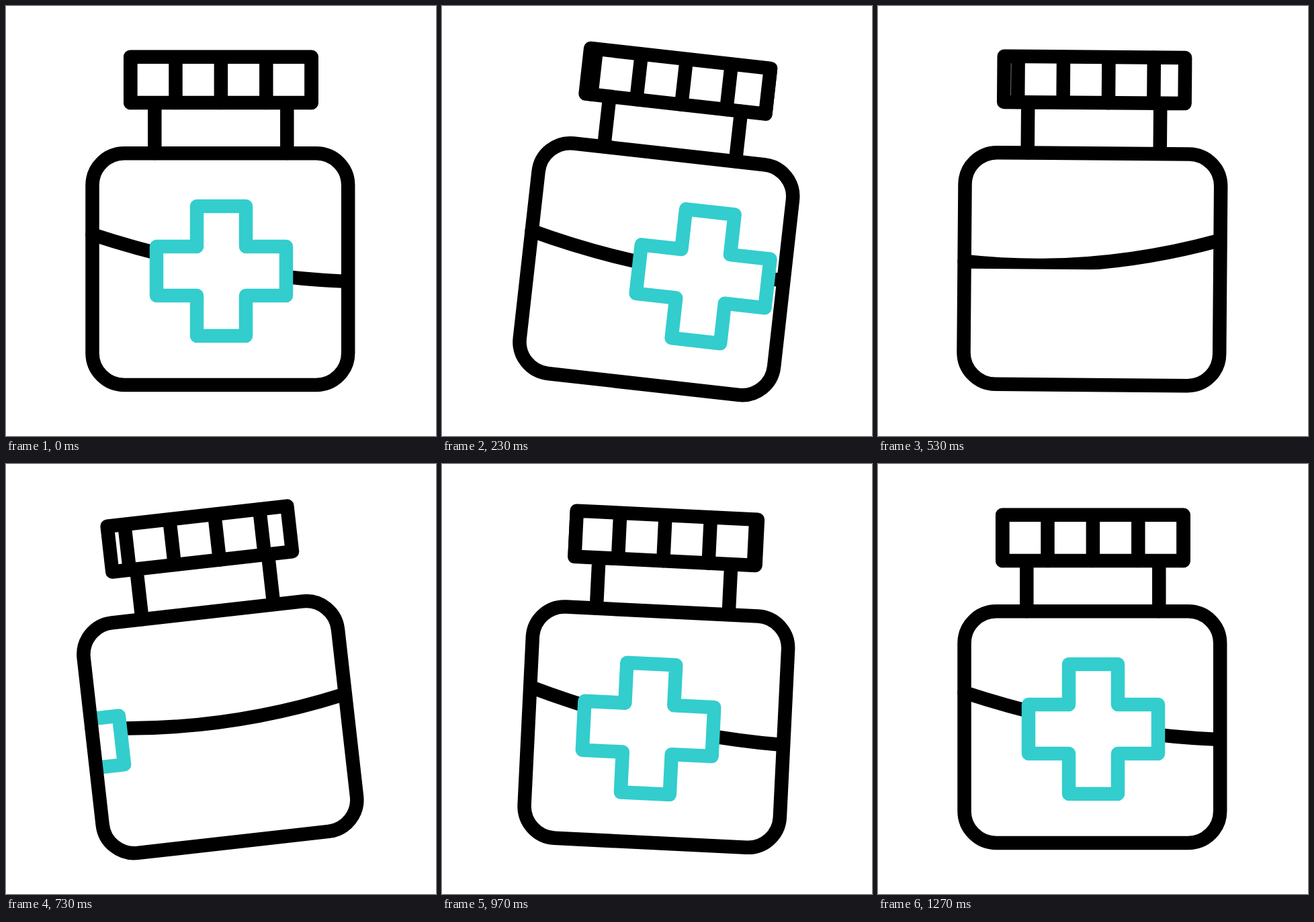
Recreate the animation shown at these times as an HTML page. Size 640 by 640 pixels, loop 1.67 s.

```html
<!DOCTYPE html>
<html lang="en">
<head>
<meta charset="utf-8">
<title>Medicine bottle</title>
<style>
  html, body { margin: 0; width: 100%; height: 100%; overflow: hidden; background: #fff; }
  svg { display: block; width: 100vw; height: 100vh; }
  .ink { fill: none; stroke: #000; stroke-width: 20.5; stroke-linecap: round; stroke-linejoin: round; }
</style>
</head>
<body>
<svg viewBox="0 0 640 640">
  <defs>
    <clipPath id="inBody"><rect x="128.5" y="219.3" width="380.7" height="344.7" rx="47.5"/></clipPath>
    <clipPath id="inCap"><rect x="175" y="65.5" width="290" height="89" rx="10"/></clipPath>
    <clipPath id="inLiquid"><rect id="level" x="100" y="200" width="440" height="220"/></clipPath>
  </defs>
  <g id="bottle">
    <g clip-path="url(#inLiquid)"><path id="wave" class="ink"/></g>
    <g clip-path="url(#inBody)">
      <path id="cross" d="M284 298H357V358H417V431H357V491H284V431H224V358H284Z"
        fill="#fff" stroke="#33cdcd" stroke-width="20.5" stroke-linejoin="round"/>
    </g>
    <g clip-path="url(#inCap)"><path id="ribs" class="ink"/></g>
    <path class="ink" d="M185.2 75.8H454.6V144H185.2Z M221.3 144V219 M418.3 144V219"/>
    <rect class="ink" x="128.5" y="219.3" width="380.7" height="344.7" rx="47.5"/>
  </g>
</svg>
<script>
const LOOP = 1670, RIB_GAP = 67.4;
const $ = id => document.getElementById(id);

// Smooth progress from frame a to frame b; bend below 1 gives a quicker start.
function ease(n, a, b, bend = 1) {
  const t = Math.min(1, Math.max(0, (n - a) / (b - a))) ** bend;
  return t * t * (3 - 2 * t);
}

function tilt(n) {
  return 10 * ease(n, 2, 10.42)
    - 16.45 * ease(n, 10.42, 21.8, 0.83)
    + 9.8 * ease(n, 21.8, 30.2)
    - 3.35 * ease(n, 30.2, 38);
}

// Leaves on the right, returns from the left.
function crossShift(n) {
  return n < 18.45 ? 310 * ease(n, 2, 18.4) : 310 * (ease(n, 18.5, 30.5) - 1);
}

function ribShift(n) {
  return 294.4 * ease(n, 2, 17) + (9 * RIB_GAP - 294.4) * ease(n, 18.7, 29.6);
}

// Parabola y = c + bx + axx as one quadratic curve.
function wavePath(k) {
  const a = -0.000378 - 0.00013 * k, b = 0.183 - 0.275 * k, c = 389 - 6.5 * k;
  const x0 = -191.5, x1 = 185, y = x => c + b * x + a * x * x;
  const mx = (x0 + x1) / 2, my = y(x0) + (b + 2 * a * x0) * (mx - x0);
  return `M${320 + x0} ${y(x0)}Q${320 + mx} ${my} ${320 + x1} ${y(x1)}`;
}

function ribPath(shift) {
  let d = "";
  for (let i = 0; i < 6; i++) {
    const x = 117.7 + shift % RIB_GAP + i * RIB_GAP;
    d += `M${x} 76V144`;
  }
  return d;
}

function draw(ms) {
  const n = Math.floor(ms * 0.03 + 0.15); // thirty steps a second
  const slosh = ease(n, 2, 14) - ease(n, 18, 30);
  $("bottle").setAttribute("transform", `rotate(${tilt(n)} 318.8 391.6)`);
  $("cross").setAttribute("transform", `translate(${crossShift(n)} 0)`);
  $("ribs").setAttribute("d", ribPath(ribShift(n)));
  $("wave").setAttribute("d", wavePath(slosh));
  $("level").setAttribute("height", 219.7 - 27.5 * slosh);
}

function tick() {
  draw(performance.now() % LOOP);
  requestAnimationFrame(tick);
}
tick();
</script>
</body>
</html>
```
